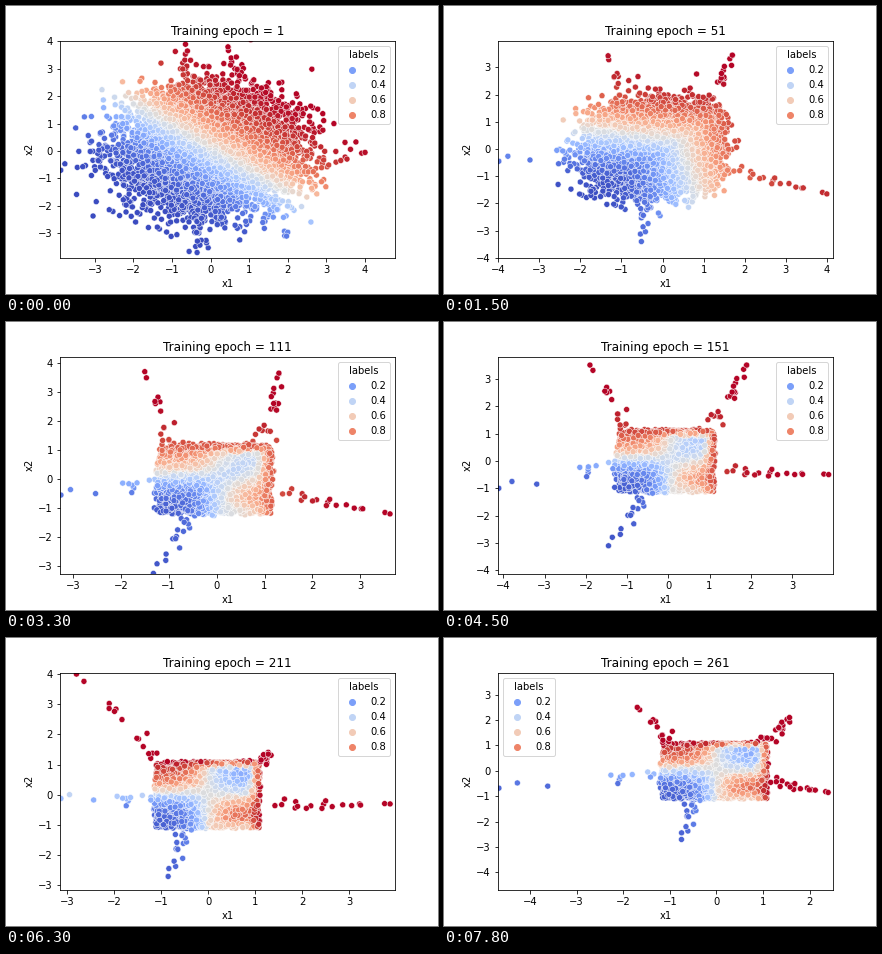
Write a matplotlib script that moves like this. It is 432x288 px and loops after 8000 ms.

```python
import numpy as np
import matplotlib.pyplot as plt
from matplotlib.animation import FuncAnimation
from matplotlib.ticker import MultipleLocator

plt.rcParams["font.family"] = "DejaVu Sans"
plt.rcParams["font.size"] = 10

STEPS = [0, 3, 7, 11, 15, 21, 26]

# Axis limits: shared low end, x high, y high.
LOW = [-3.9, -3.88, -4.13, -3.27, -4.13, -3.15, -4.69]
X_HIGH = [4.77, 4.16, 4.13, 3.72, 3.99, 3.97, 2.5]
Y_HIGH = [4.03, 3.99, 3.98, 4.22, 3.81, 4.05, 3.87]

# How far each side of the bell is flattened into a box.
LEFT = [0, 0.15, 0.62, 0.9, 0.9, 0.96, 0.93]
RIGHT = [0, 0.68, 0.74, 0.95, 0.97, 0.98, 0.98]
UPRIGHT = [0, 0.18, 0.69, 0.92, 0.96, 0.98, 0.98]

# Far ends of the strings of stray points.
TOP_LEFT = [[-0.6, -1, -1.65, -1.5, -1.9, -2.8, -1.7],
            [3.65, 3.75, 3.1, 3.7, 3.5, 4, 2.5]]
TOP_RIGHT = [[0.45, 2.15, 1.25, 1.3, 1.9, 1.28, 1.57],
             [3.8, 3.8, 3.1, 3.65, 3.5, 1.35, 2.1]]
BOTTOM = [[-0.35, 0.2, -1.23, -1.32, -1.45, -0.85, -0.75],
          [-3.7, -3.5, -3.3, -3.25, -3.1, -2.7, -2.7]]
RIGHT_Y = [-0.05, -2.05, -1.25, -1.2, -0.5, -0.3, -0.85]
LEFT_Y = [-0.7, 0.5, -1.4, -0.55, -1, -0.12, -0.68]

rng = np.random.default_rng(7)
cloud = rng.normal(size=(9000, 2))


def at(values, step):
    return np.interp(step, STEPS, values)


def strand(n, spread, early, late):
    """Offsets along and around one string, with its root before and after."""
    along = np.append(rng.random(n - 1) ** 1.7, 1.0)[:, None]
    return along, rng.normal(0, spread, (n, 2)), np.array(early), np.array(late)


strands = [
    strand(15, 0.10, (-1, 2), (-1, 1.05)),
    strand(22, 0.10, (1, 1.7), (1, 1)),
    strand(20, 0.14, (1.9, -1), (1.1, -0.4)),
    strand(13, 0.16, (-2.5, 0), (-1.2, -0.2)),
    strand(17, 0.10, (-0.4, -2.4), (-0.5, -1.1)),
]


def tips(step):
    pairs = [TOP_LEFT, TOP_RIGHT, [np.minimum(4, np.array(X_HIGH) - 0.1), RIGHT_Y],
             [np.array(LOW) + 0.02, LEFT_Y], BOTTOM]
    return [np.array([at(x, step), at(y, step)]) for x, y in pairs]


def cdf(z):
    return 0.5 + 0.5 * np.tanh(0.79788 * z + 0.03567 * z ** 3)


def squash(z, low, high):
    w = np.where(z < 0, low, high)
    return (1 - w) * z + w * 1.06 * (2 * cdf(z) - 1)


def positions(step):
    count = int(np.interp(step, [0, 7, 26], [9000, 5500, 4000]))
    upright = at(UPRIGHT, step)
    x = squash(cloud[:count, 0], at(LEFT, step), at(RIGHT, step))
    y = squash(cloud[:count, 1], upright, upright)
    pinch = np.interp(step, [0, 3, 7], [0, 0.4, 0])
    y = np.where(y < 0, y * (1 - pinch * np.clip(x - 0.3, 0, 1)), y)
    parts = [np.column_stack([x, y])]
    settled = min(1, step / 9)
    for (along, jitter, early, late), tip in zip(strands, tips(step)):
        root = early + settled * (late - early)
        parts.append(root + along * (tip - root) + jitter * (1 - along ** 4))
    return np.concatenate(parts)


def labels(points, step):
    """Diagonal ramp, then an elbow, then two interlocked tongues."""
    x, y = points.T
    ramp = cdf(0.63 * x + 0.77 * y - 0.1)
    elbow = cdf(1.15 * np.maximum(x - 0.58, y - 0.5))
    depth = np.where(x < 0, 0.47, np.where(y > 0, 0.3, 0.42))
    tongues = 0.5 - depth * np.tanh(2.4 * x) * np.tanh(2.2 * (y - 0.1 * (x < 0)))
    floor = np.clip((-y - 0.75) / 0.3, 0, 1) * (x > 0)
    tongues += (0.6 - tongues) * floor
    rim = np.clip((np.maximum(x, y) - 0.83) / 0.28, 0, 1)
    tongues += (1 - tongues) * rim
    stage = np.interp(step, [0, 7, 11, 21], [0, 1, 1.5, 2])
    fields = (ramp, elbow, tongues)
    return sum(max(0, 1 - abs(stage - i)) * f for i, f in enumerate(fields))


fig, ax = plt.subplots(figsize=(6, 4), dpi=72)
fig.subplots_adjust(left=0.125, right=0.9, bottom=0.125, top=0.88)
ax.set_xlabel("x1")
ax.set_ylabel("x2")
ax.xaxis.set_major_locator(MultipleLocator(1))
ax.yaxis.set_major_locator(MultipleLocator(1))
title = ax.set_title("")

start = positions(0)
dots = ax.scatter(*start.T, c=labels(start, 0), s=36, cmap="coolwarm", vmin=0, vmax=1,
                  edgecolors="w", linewidths=0.48)
for value in (0.2, 0.4, 0.6, 0.8):
    ax.scatter([], [], s=36, color=plt.cm.coolwarm(value), label=f"{value}")
legend = ax.legend(title="labels", loc="upper right")


def update(frame):
    step = frame // 3
    points = positions(step)
    dots.set_offsets(points)
    dots.set_array(labels(points, step))
    ax.set_xlim(at(LOW, step), at(X_HIGH, step))
    ax.set_ylim(at(LOW, step), at(Y_HIGH, step))
    title.set_text(f"Training epoch = {10 * step + 1}")
    legend.set_loc("upper left" if step > 24 else "upper right")
    return dots, title, legend


anim = FuncAnimation(fig, update, frames=80, interval=100, repeat=True, repeat_delay=0)
plt.show()
```
